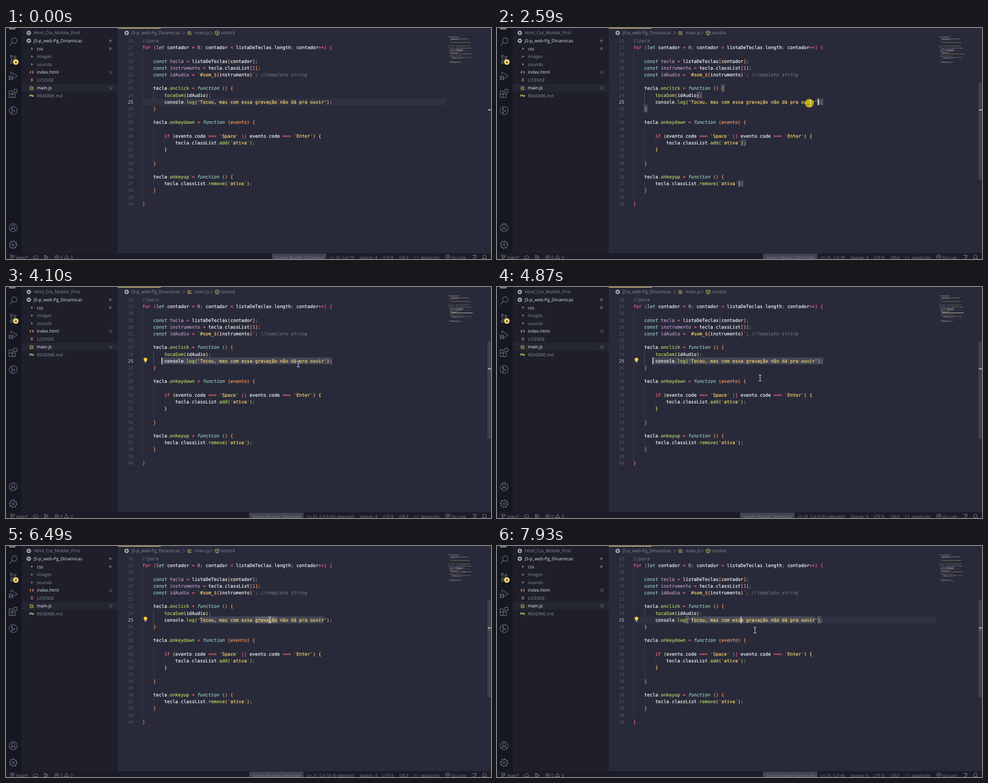
Animation, 1085 px wide and 516 px high, one loop 8000 ms. Source, as an HTML page:

```html
<!DOCTYPE html>
<html lang="pt">
<head>
<meta charset="utf-8">
<title>Editor</title>
<style>
html, body { margin: 0; width: 100%; height: 100%; overflow: hidden; background: #282a3a; }
svg { display: block; width: 1085px; height: 516px; }
text { font: 9.95px "Open Sans", sans-serif; fill: #888d94; white-space: pre; text-rendering: geometricPrecision; }
.code text { font: 10.235px "DejaVu Sans Mono", monospace; }
.code tspan { fill: currentColor; stroke: currentColor; stroke-width: .22; }
.bar text { font-size: 9.2px; fill: #7b7f8a; }
.ln { fill: #535763; text-anchor: end; }
.icon { fill: none; stroke: #696d77; stroke-width: 1.3; stroke-linejoin: round; stroke-linecap: round; }
.thin { fill: none; stroke: #888d94; stroke-width: 1; }
.guide { stroke: #3a3c4b; }
.box { fill: #eaf2f1; fill-opacity: .08; stroke: #7a7d87; stroke-width: .8; }
.sel { fill: #eaf2f1; fill-opacity: .14; }
#slider { animation: show 8s linear infinite; }
@keyframes show { 0%, 4% { opacity: 0 } 9%, 100% { opacity: 1 } }
</style>
</head>
<body>
<svg viewBox="0 0 1085 516">
  <rect width="1085" height="516" fill="#282a3a"/>
  <rect width="250" height="504" fill="#1e1f2b"/>
  <rect width="35" height="504" fill="#161821"/>
  <rect x="35" y="125" width="215" height="17.5" fill="#242632"/>
  <rect x="250" width="96" height="1.2" fill="#ffd76d"/>

  <g class="icon">
    <path d="M8 0V2H20V0" stroke="#d5dadb"/>
    <circle cx="18.5" cy="28" r="6"/><path d="M14 32.5L8 39"/>
    <circle cx="12" cy="63" r="2.4"/><circle cx="20" cy="65" r="2.4"/><circle cx="12" cy="77" r="2.4"/>
    <path d="M12 65.5V74.5M20 67.5C20 72 12 70 12 74"/>
    <path d="M11 104V98L25 107L17 112.5"/><circle cx="11" cy="111.5" r="3.8"/>
    <path d="M7.2 111.5H15M6 107L8.5 109M16 107L13.5 109M6 116L8.5 114M16 116L13.5 114"/>
    <path d="M7 140.5H14V155H7ZM7 147.5H21V155H14M17.5 137H24.5V144H17.5Z"/>
    <circle cx="16" cy="184.5" r="9"/><path d="M13.5 179.5V189.5M13.5 182L18.5 185.5"/>
    <circle cx="13.5" cy="180" r="1"/><circle cx="13.5" cy="189" r="1"/><circle cx="18.5" cy="186" r="1"/>
    <circle cx="16" cy="446" r="9"/><circle cx="16" cy="443.5" r="3.7"/><path d="M10 452.5C11 447 21 447 22 452.5"/>
    <circle cx="16" cy="484" r="7.2"/><circle cx="16" cy="484" r="2.3"/>
    <circle cx="16" cy="484" r="8.4" stroke-width="2" stroke-dasharray="2.6 4" stroke-linecap="butt"/>
  </g>
  <circle cx="22" cy="76" r="6.2" fill="#ffd76d"/>
  <text x="22" y="78.8" text-anchor="middle" style="font-size:7.5px;font-weight:700;fill:#161821">4</text>

  <g id="tree"></g>
  <g id="crumbs"></g>

  <g class="code">
    <g id="guides"></g>
    <g id="under"></g>
    <g id="lines"></g>
    <text id="dots" style="fill:#7c808b"></text>
  </g>
  <g id="map" opacity=".5"></g>
  <rect id="mapSel" y="56.9" height="1.7" fill="#eaf2f1" opacity=".35"/>

  <rect id="slider" x="1077" y="121.5" width="8" height="217" fill="#eaf2f1" fill-opacity=".11"/>
  <rect x="1078" y="182" width="7" height="1.8" fill="#d5dadb"/>
  <rect id="mark" x="1078" y="186" width="5" height="2" fill="#696d77"/>

  <g id="bulb">
    <circle cx="312" cy="162" r="4" fill="#ffcc3d"/><rect x="310.2" y="164.5" width="3.6" height="2" fill="#ffcc3d"/>
    <rect x="310.3" y="167.2" width="3.4" height="1.6" fill="#c5c8cc"/>
  </g>
  <rect id="caret" y="157.6" width="1.6" height="15" fill="#fff"/>

  <g class="bar">
    <rect y="503" width="1085" height="13" fill="#1b1c27"/>
    <g class="thin" stroke="#7b7f8a">
      <circle cx="12" cy="508.5" r="1.5"/><circle cx="17" cy="509.5" r="1.5"/><path d="M12 510V516M17 511C17 514 12 513 12 515"/>
      <path d="M61 514C60 510 64 509 65 510C67 507 71 509 70 512C72 513 71 515 70 515H62Z"/>
      <circle cx="87" cy="509" r="1.5"/><circle cx="92.5" cy="513" r="1.5"/><path d="M87 510.5V516M88 509.5H92V511.5M85 514L91 516"/>
      <circle cx="113.5" cy="512" r="4.3"/><path d="M111.5 510L115.5 514M115.5 510L111.5 514M131 515.5L135.5 507.5L140 515.5Z"/>
      <path d="M985 515A5 5 0 1 1 992 515M987 513.5A2.5 2.5 0 1 1 990 513.5M988.5 512V516"/>
      <path d="M1043 508H1051V514H1047L1044 516M1048 511L1052 507"/>
      <path d="M1066 515H1075L1073.8 513V510.5A3.3 3.3 0 0 0 1067.2 510.5V513Z"/>
    </g>
    <g id="status"></g>
    <g id="pos">
      <rect x="595" y="504" width="121.5" height="12" fill="#424453"/>
      <text x="602" y="516">Screen Reader Optimized</text>
      <text id="ln" x="724" y="516"></text>
    </g>
  </g>

  <g id="mouse">
    <circle id="click" cx="-2" r="9.8" fill="#e6d200" fill-opacity=".72"/>
    <path d="M-3 -6.5H-1L0 -5.5L1 -6.5H3M0 -5.5V5.5M-3 6.5H-1L0 5.5L1 6.5H3" fill="none" stroke="#e4e6e8" stroke-width="1.1"/>
  </g>
</svg>
<script>
const $ = id => document.getElementById(id);
const add = (parent, tag, attrs, text) => {
  const e = document.createElementNS('http://www.w3.org/2000/svg', tag);
  for (const k in attrs) e.setAttribute(k, attrs[k]);
  if (text !== undefined) e.textContent = text;
  parent.appendChild(e);
  return e;
};
const CW = 6.162, LH = 15.2, X0 = 305;
const colX = c => X0 + c * CW;
const base = n => 31.9 + (n - 16) * LH;
const lineTop = n => base(n) - 11.3;
const red = '#ff657a', orange = '#ff9b5e', yellow = '#ffd76d', green = '#bad761',
      cyan = '#9cd1bb', purple = '#c39ac9', white = '#f4f9f8', dim = '#888d94', gray = '#696d77';
const levels = [red, orange, yellow, green];

const code = String.raw`//para
for (let contador = 0; contador < listaDeTeclas.length; contador++) {

    const tecla = listaDeTeclas[contador];
    const instrumento = tecla.classList[1];
    const idAudio = ~#som_$\{instrumento}~; //template string

    tecla.onclick = function () {
        tocaSom(idAudio);
        console.log("Tocou, mas com essa gravação não dá pra ouvir");
    }

    tecla.onkeydown = function (evento) {

        if (evento.code === 'Space' || evento.code === 'Enter') {
            tecla.classList.add('ativa');
        }

    }

    tecla.onkeyup = function () {
        tecla.classList.remove('ativa');
    }

}`.replace(/~/g, '`').replace('\\{', '{').split('\n');

// Split code into [text, colour, italic], tracking bracket depth across lines.
let depth = 0;
function tokens(line) {
  const out = [], re = /\/\/.*|"[^"]*"|'[^']*'|`|#som_|\$\{|[\wÀ-ú]+|\s+|[=<|+]+|./g;
  let m, last = '', tpl = false;
  while ((m = re.exec(line))) {
    const s = m[0], rest = line.slice(re.lastIndex);
    let c = white, it = false;
    if (/^\/\//.test(s)) { c = gray; it = true; }
    else if (/^["']/.test(s)) {
      out.push([s[0], dim], [s.slice(1, -1), yellow], [s[0], dim]);
      continue;
    }
    else if (s === '`' || /^[.;,]$/.test(s)) c = dim;
    else if (s === '#som_') c = yellow;
    else if (s === '${') { c = orange; tpl = true; }
    else if (s === '}' && tpl) { c = orange; tpl = false; }
    else if (/^[([{]$/.test(s)) c = levels[depth++ % 4];
    else if (/^[)\]}]$/.test(s)) c = levels[--depth % 4];
    else if (/^[=<|+]+$/.test(s) || s === 'for' || s === 'if') c = red;
    else if (/^(const|let|function)$/.test(s)) { c = cyan; it = true; }
    else if (/^\d+$/.test(s)) c = purple;
    else if (s === 'evento' && rest[0] === ')') { c = orange; it = true; }
    else if (last === 'const') c = purple;
    else if (rest[0] === '(' || /^on/.test(s)) c = green;
    out.push([s, c, it]);
    if (s.trim()) last = s;
  }
  return out;
}

const mapY = n => 19 + (n - 1) * 1.6;
const mapBar = (n, col, len, fill) =>
  add($('map'), 'rect', { x: 989 + col * .8, y: mapY(n), width: len * .8, height: .9, fill });

code.forEach((line, i) => {
  const n = i + 16, y = base(n);
  add($('lines'), 'text', { x: 285, y, class: 'ln', style: n === 25 ? 'fill:#c9cfd2' : '' }, n);
  const t = add($('lines'), 'text', { x: X0, y });
  let col = 0;
  for (const [s, c, it] of tokens(line)) {
    add(t, 'tspan', { style: `color:${c}` + (it ? ';font-style:italic' : '') }, s);
    if (s.trim()) mapBar(n, col, s.length, c);
    col += s.length;
  }
});
[[1, 0, 8, cyan], [1, 9, 21, green], [2, 4, 5, cyan], [2, 10, 18, purple], [4, 4, 2, red], [4, 7, 50, white],
 [5, 8, 8, white], [5, 17, 12, green], [6, 4, 1, yellow], [7, 4, 4, red], [9, 8, 54, yellow], [10, 4, 1, yellow],
 [12, 0, 1, red], [14, 0, 5, cyan], [14, 6, 13, purple], [14, 22, 40, green]].forEach(a => mapBar(...a));

// Indent guides: column, first line, last line, colour
[[0, 18, 39], [4, 24, 25, '#55586a'], [4, 29, 33], [4, 37, 37], [8, 31, 31]].forEach(([c, a, b, s]) =>
  add($('guides'), 'path', { d: `M${colX(c) + .5} ${lineTop(a)}V${lineTop(b + 1)}`, class: 'guide', style: s ? 'stroke:' + s : '' }));

// File tree
const tree = $('tree');
const disc = (g, x, y, d) => {
  add(g, 'circle', { cx: x, cy: y, r: 5, fill: '#a0a5ab' });
  add(g, 'path', { d, fill: '#1e1f2b', transform: `translate(${x} ${y})` });
};
const right = 'M-1.5 -2.6L2.6 0L-1.5 2.6Z', down = 'M-2.6 -1.5H2.6L0 2.6Z';
const bright = '#dfe4e6';
disc(tree, 51, 11, right);
disc(tree, 51, 28.5, down);
[['Html_Css_Mobile_First', 62], ['JS-p_web-Pg_Dinamicas', 62, bright, 'dot'], ['css', 69, bright, 'dot'], ['images', 69],
 ['sounds', 69], ['index.html', 69, bright, 'U'], ['LICENSE', 69], ['main.js', 69, '#fff', 'U'], ['README.md', 69]]
  .forEach(([name, x, fill, tag], i) => {
    const y = 11 + i * 17.55;
    add(tree, 'text', { x, y: y + 3.4, style: `fill:${fill || dim}` }, name);
    if (tag === 'dot') add(tree, 'circle', { cx: 233.5, cy: y, r: 3, fill: '#535763' });
    if (tag === 'U') add(tree, 'text', { x: 231, y: y + 3.4 }, 'U');
    if (i > 1 && i < 5) add(tree, 'path', { d: `M56.5 ${y - 3}L60.5 ${y}L56.5 ${y + 3}Z`, fill: dim });
  });
add(tree, 'path', { d: 'M56 96L53.5 98.7L56 101.5M59 96L61.5 98.7L59 101.5', fill: 'none', stroke: orange, 'stroke-width': 1.4 });
add(tree, 'path', { d: 'M55 113.5H60.5M55 116H60.5M55 118.5H60.5', stroke: orange });
const js = (g, x, y) => add(g, 'text', { x, y, style: `fill:${yellow};font-weight:700` }, '();');
js(tree, 53, 137);
add(tree, 'path', { d: 'M53 153.5V149L55.2 151.5L57.5 149V153.5M60.5 149V153M58.8 151.2L60.5 153.2L62.2 151.2', fill: 'none', stroke: green, 'stroke-width': 1.2 });

// Breadcrumbs
const crumbs = $('crumbs');
disc(crumbs, 270, 11, right);
[[281, 'JS-p_web-Pg_Dinamicas'], [422, 'main.js'], [481, 'onclick']].forEach(([x, s]) => add(crumbs, 'text', { x, y: 14.4 }, s));
js(crumbs, 406, 14);
add(crumbs, 'path', { d: 'M396 7.5L399.5 11L396 14.5M457.5 7.5L461 11L457.5 14.5', class: 'thin' });
add(crumbs, 'path', { d: 'M472.5 6L477 8.3V13.5L472.5 16L468 13.5V8.3ZM468 8.3L472.5 10.8L477 8.3M472.5 10.8V16', fill: 'none', stroke: green });

[[23, 'main*'], [119, ' 0'], [142, ' 0'], [791, 'Spaces: 4'], [842, 'UTF-8'], [880, 'CRLF'], [913, '{ }'], [928, 'JavaScript'], [997, 'Go Live']]
  .forEach(([x, s]) => add($('status'), 'text', { x, y: 516 }, s));

// Changing layers behind the code
const under = $('under');
const cell = (n, a, b, cls) => add(under, 'rect', { x: colX(a), y: lineTop(n), width: (b - a) * CW, height: LH, class: cls });
const active = add(under, 'rect', { x: X0, y: lineTop(25), width: 983 - X0, height: LH, fill: '#303241' });
const strHl = cell(25, 21, 66, 'sel');
const sel = cell(25, 0, 0, 'sel');
const ends = [[24, 23], [31, 39], [37, 38]].map(([n, c]) => cell(n, c, c + 2, 'sel'));
const block = [cell(23, 32, 33, 'box'), cell(26, 4, 5, 'box')];
const parens = [cell(25, 19, 20, 'box'), cell(25, 67, 68, 'box')];
$('dots').setAttribute('x', X0);
$('dots').setAttribute('y', base(25));

// Pointer path: time, x, y
const path = [
  [330, 1047, 394], [450, 990, 320], [650, 760, 120], [780, 640, 56], [900, 585, 78], [1000, 625, 128], [1090, 682, 160],
  [1230, 695, 164], [1450, 752, 160], [1700, 664, 158], [1930, 733, 164], [2430, 731, 165], [2590, 701, 168],
  [2800, 630, 168], [2950, 540, 166], [3360, 362, 164], [3560, 347, 164], [3890, 350, 165], [4100, 654, 172],
  [4300, 590, 150], [4500, 480, 192], [4670, 440, 190], [4900, 610, 205], [5130, 520, 128], [5430, 590, 165],
  [6490, 590, 165], [6980, 574, 180], [7250, 572, 178], [7460, 546, 165], [7560, 546, 165], [7860, 577, 188]];
function pointer(t) {
  const i = path.findIndex(p => p[0] > t);
  if (i < 0) return path[path.length - 1].slice(1);
  if (!i) return null;
  const [t0, x0, y0] = path[i - 1], [t1, x1, y1] = path[i];
  const k = (t - t0) / (t1 - t0);
  return [x0 + (x1 - x0) * k, y0 + (y1 - y0) * k];
}

const show = (e, on) => e.setAttribute('visibility', on ? 'visible' : 'hidden');
const within = (t, a, b) => t >= a && t < b;

// Selection (a..b), caret column and the moment its blink began
function editor(t, mx) {
  if (t < 2430) return { a: 69, b: 69 };
  if (t < 2520) return { a: 69, b: 69, caret: 69, since: 2430 };
  if (t < 2660) return { a: 67, b: 69, caret: 67, since: t, label: 'Col 70' };
  if (t < 3690) {
    const c = t < 3560 ? Math.max(7, Math.min(67, Math.round((mx - X0) / CW))) : 7;
    return { a: c, b: 69, caret: c, since: t };
  }
  if (t < 5650) return { a: 7, b: 69, caret: 7, since: 3690 };
  if (t < 5850) return { a: 46, b: 46, caret: 46, since: 5650 };
  if (t < 7480) return { a: 41, b: 49, caret: 49, since: 5850 };
  return { a: 39, b: 39, caret: 39, since: 7480 };
}

function draw(t) {
  const p = pointer(t), e = editor(t, p ? p[0] : 0);
  const { a, b, caret } = e, some = b > a;
  show($('mouse'), p);
  if (p) $('mouse').setAttribute('transform', `translate(${p[0]} ${p[1]})`);
  $('click').setAttribute('opacity', within(t, 2430, 3560) || within(t, 5560, 5900) || within(t, 7440, 7580) ? 1 : 0);

  sel.setAttribute('x', colX(a));
  sel.setAttribute('width', (b - a) * CW);
  $('dots').textContent = [...code[9]].map((ch, i) => ch === ' ' && i >= a && i < b ? '·' : ' ').join('');
  $('mapSel').setAttribute('x', 989 + a * .8);
  $('mapSel').setAttribute('width', (b - a) * .8);

  show($('caret'), caret && (t - e.since) % 1000 < 500);
  $('caret').setAttribute('x', colX(caret || 0) - .3);
  show(active, !some);
  const drag = within(t, 2520, 2660);
  ends.concat(block).forEach(r => show(r, drag));
  parens.forEach(r => show(r, within(t, 5650, 5850) || t >= 7480));
  show(strHl, t >= 6420);
  show($('mark'), t >= 6220);
  show($('bulb'), within(t, 3890, 5650) || within(t, 6420, 7480) || t >= 7800);

  const wide = some && !e.label;
  $('pos').setAttribute('transform', `translate(${wide ? -51 : 0} 0)`);
  $('ln').textContent = 'Ln 25, ' + (e.label || `Col ${(caret || 69) + 1}`) + (wide ? ` (${b - a} selected)` : '');
}

const loop = () => {
  draw(performance.now() % 8000);
  requestAnimationFrame(loop);
};
loop();
</script>
</body>
</html>
```
